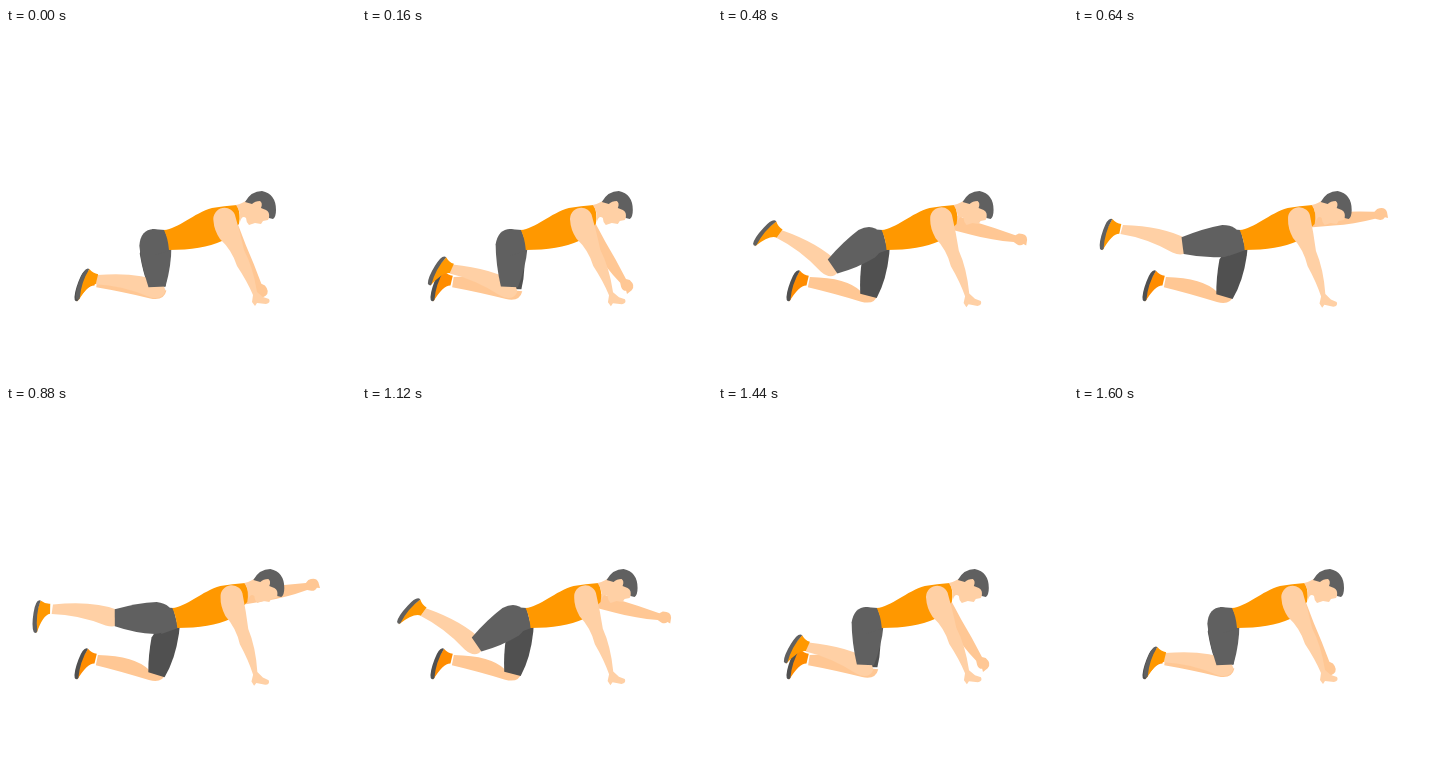
These frames come from a looping animation (350 by 350 pixels, 1.68 s). An HTML page without scripts:

```html
<!DOCTYPE html>
<html lang="en">
<head>
<meta charset="utf-8">
<title>Bird dog exercise</title>
<style>
  @property --tick { syntax: "<number>"; inherits: true; initial-value: 0; }
  @property --p { syntax: "<number>"; inherits: true; initial-value: 0; }
  @property --early { syntax: "<number>"; inherits: true; initial-value: 0; }
  @property --late { syntax: "<number>"; inherits: true; initial-value: 0; }

  html, body { margin: 0; width: 100%; height: 100%; overflow: hidden; background: #fff; }

  /* --p runs from 0 (rest) to 1 (full stretch) and back along a cosine */
  svg {
    display: block; width: 100vw; height: 100vh;
    --p: calc((1 - cos(var(--tick) * 18deg)) / 2);
    --early: calc(var(--p) * (2 - var(--p)));
    --late: calc(var(--p) * var(--p) * var(--p) * var(--p));
    --skin: #ffd0a5; --orange: #ff9800; --gray: #606060;
    animation: tick 1680ms steps(21) infinite;
  }
  @keyframes tick { from { --tick: 0; } to { --tick: 21; } }

  /* limbs on the far side are a little darker */
  .far { --skin: #ffc794; --orange: #ff8c00; --gray: #505050; }
  .skin { fill: var(--skin); }
  .orange { fill: var(--orange); }
  .gray { fill: var(--gray); }

  .body { transform: translateX(calc(8.5px * var(--p))); }

  .far-arm {
    transform: translate(calc(220px + 10px * var(--p)), calc(193px + 1px * var(--p)))
      rotate(calc(63.4deg - 76deg * var(--p)));
  }
  .near-arm {
    transform-origin: 250px 268px;
    transform: translateY(calc(2px * var(--p))) rotate(calc(5.4deg * var(--p)));
  }

  .rest-thigh {
    transform: translate(calc(148px + 16px * var(--early)), calc(211px + 11.6px * var(--early)))
      rotate(calc(87deg + 20deg * var(--early)));
  }
  /* the resting shin turns about its ankle */
  .rest-shin {
    transform: translate(92px, 253.5px) rotate(calc(187.5deg + 4deg * var(--early))) translateX(-60px);
  }
  .rest-shoe { transform: translate(92px, 253.5px) rotate(199deg); }

  .thigh {
    transform: translate(calc(148px + 9px * var(--p)), 211px)
      rotate(calc(87deg + 1deg * var(--p) * (48 + 95 * var(--p) - 48 * var(--p) * var(--p))));
  }
  .lower-leg {
    transform: translateX(50px)
      rotate(calc(102deg - 1deg * var(--p) * (-74 + 233 * var(--p) - 60 * var(--p) * var(--p))));
  }
  .foot {
    transform: translateX(calc(58px + 3px * var(--late))) rotate(calc(10deg - 12deg * var(--late)));
  }
</style>
</head>
<body>
<svg viewBox="0 0 350 350" role="img" aria-label="Man on hands and knees stretching one arm and one leg">
  <defs>
    <g id="shoe">
      <path class="orange" d="M13 7Q8 4 3 5L2-5Q9-7 13-26L16-8Z"/>
      <path class="gray" d="M13 7Q18 8 18.500-6T16-25Q13.500-27 12.500-24Q16.500-8 13 7Z"/>
    </g>
  </defs>

  <g class="far">
    <path class="far-arm skin" d="M0-10L30-7Q50-6 72-3.500L75-6Q83-8 84.500-2L85 4L82 3Q80 6 76 5L72 3.500Q50 7 30 6.500L0 6Z"/>
    <path class="rest-shin skin" d="M-4 0L8 0Q24 11 61 4.500V-6Q35-7 6-10Q-8-11-9 0Z"/>
    <use href="#shoe" class="rest-shoe"/>
    <path class="rest-thigh gray" d="M0 11L14 15Q32 13 48 8V-9Q28-14 2-10L-8-8Z"/>
  </g>

  <g class="thigh">
    <g class="lower-leg">
      <path class="skin" d="M-4 8Q22 14 61 4.500V-5Q35-2 6-9Q-8-11-9 0Z"/>
      <use href="#shoe" class="foot"/>
    </g>
    <path class="gray" d="M-10 0Q-10 13 6 15Q26 14 48 8V-9Q28-16 8-17Q-6-16-10 0Z"/>
  </g>

  <g class="body">
    <path class="gray" d="M146 201L159 202L164 222L147 228Z"/>
    <path class="orange" d="M158 202C172 201 188 185 206 180Q218 178 231 177Q235 186 233 196L216 213Q196 222 163 222Q162 210 158 202Z"/>
    <path class="skin" d="M230 177Q238 175 242 171L258 172L264 188L262 192L257 193L255 196L249 195L243 197Q240 194 240 190Q236 187 234 194Q235 184 230 177Z"/>
    <path class="gray" d="M239 174Q245 163 256 163Q270 166 270 182Q270 189 267 191L263 190Q264 184 260 182L255 180Q257 175 254 173Q249 173 246 176Z"/>
  </g>

  <path class="near-arm skin" d="M207.500 193A11 11 0 0 1 229.500 189Q234 204 238 222Q247 239 251 264L257 269L263 271Q265 275 260 276L251 275L249 278L246 274L247 267Q241 253 231 238Q226 222 214 211Q208 202 207.500 193Z"/>
</svg>
</body>
</html>
```
